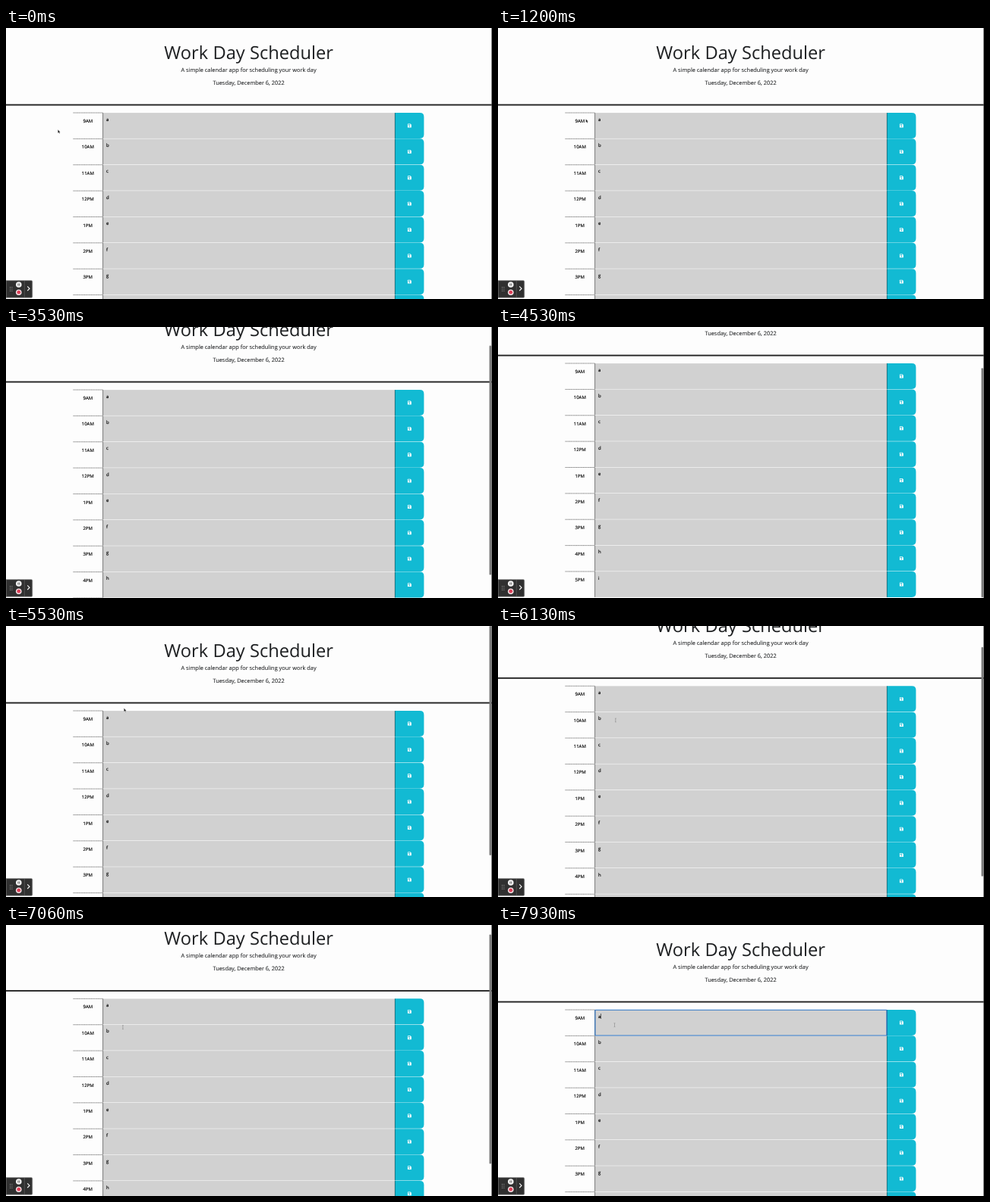
These frames come from a looping animation (640 by 358 pixels, 8000 ms). An HTML page:

```html
<!DOCTYPE html>
<html lang="en">
<head>
<meta charset="utf-8">
<title>Work Day Scheduler</title>
<style>
  html, body { margin: 0; width: 100%; height: 100%; overflow: hidden; background: #fdfdfd; }
  svg { display: block; width: 640px; height: 358px; }
  text { font-family: "Open Sans", "Noto Sans", sans-serif; fill: #1d1f21; text-rendering: geometricPrecision; }
  .mid { text-anchor: middle; }
  .head { font-size: 7.4px; stroke: #1d1f21; stroke-width: .08px; }
  .small { font-size: 6px; fill: #000; stroke: #000; stroke-width: .15px; }
</style>
</head>
<body>
<svg viewBox="0 0 640 358">
  <defs>
    <g id="save">
      <path d="M-2.4-1.9q0-.5.5-.5H1.3L2.5-1.2V1.9q0 .5-.5.5H-1.9q-.5 0-.5-.5z" fill="#fff"/>
      <path d="M-1.7-1.7H.9V-.5H-1.7z" fill="#12bad3"/>
      <circle cy=".9" r=".75" fill="#12bad3"/>
    </g>
  </defs>

  <g id="page">
    <text class="mid" x="319.7" y="40.8" font-size="23.7">Work Day Scheduler</text>
    <text class="mid head" x="319.6" y="57.6">A simple calendar app for scheduling your work day</text>
    <text class="mid head" x="319.6" y="74.6">Tuesday, December 6, 2022</text>
    <rect y="100.6" width="640" height="1.9" fill="#222"/>
    <g id="rows"></g>
    <g id="focus">
      <rect x="127.9" y="112.2" width="384" height="33.8" rx=".6" fill="none" stroke="#2a74c8" stroke-width="1.1"/>
      <rect x="135.4" y="117" width=".6" height="7" fill="#111"/>
    </g>
  </g>

  <rect id="thumb" x="636.5" width="2.5" height="303" rx="1.2" fill="#7c7c7c"/>
  <rect x="639.3" width=".7" height="358" fill="#444"/>

  <g id="recorder">
    <path d="M0 333.6H33.3q1.5 0 1.5 1.5V354.8q0 1.5-1.5 1.5H0z" fill="#303030" stroke="#999" stroke-width=".8"/>
    <path d="M24.3 334V356" stroke="#666" stroke-width=".6"/>
    <path d="M5.6 342v6M7.9 342v6" stroke="#aaa" stroke-width=".9" stroke-dasharray="1 1.4"/>
    <circle cx="16.8" cy="339" r="3.8" fill="#f4f4f4"/>
    <path d="M15.9 337.5v3M17.7 337.5v3" stroke="#444" stroke-width=".8"/>
    <circle cx="16.8" cy="349.2" r="3.8" fill="#f4e4e6"/>
    <circle cx="16.8" cy="349.2" r="2.4" fill="#dc4058"/>
    <path d="M28.2 341.3l2.8 2.9-2.8 2.9" fill="none" stroke="#fff" stroke-width="1.1"/>
  </g>

  <path id="arrow" d="M0 0V4.5L1.1 3.6 1.9 5.2 2.7 4.8 1.9 3.3H3.2z" fill="#111" stroke="#fff" stroke-width=".3"/>
  <path id="beam" d="M-.8-2.6Q0-2.6 0-2V2Q0 2.6-.8 2.6M.8-2.6Q0-2.6 0-2M0 2Q0 2.6.8 2.6" fill="none" stroke="#777" stroke-width=".5"/>
</svg>

<script>
const LOOP = 8000, TOP = 111.9, PITCH = 34.37, MAX_SCROLL = 64.4;
const $ = id => document.getElementById(id);

const row = i => {
  const hour = 9 + i, label = (hour > 12 ? hour - 12 : hour) + (hour < 12 ? "AM" : "PM");
  return `<g transform="translate(0 ${TOP + i * PITCH})">
    <path d="M88.5 .1H127.4" stroke="#222" stroke-width=".6" stroke-dasharray="1.2 .6"/>
    <text class="mid small" x="107.8" y="13.2">${label}</text>
    <rect x="127.5" y=".2" width="384.5" height="33.8" fill="#d1d1d1"/>
    <path d="M127.6 .2V34" stroke="#333" stroke-width=".6"/>
    <text class="small" x="131.9" y="10.8">${"abcdefghi"[i]}</text>
    <path d="M512 .1H545q5.4 0 5.4 5.4V28.7q0 5.4-5.4 5.4H512z" fill="#12bad3"/>
    <path d="M512.3 .2V34" stroke="#1c3c42" stroke-width=".6"/>
    <use href="#save" x="531.3" y="17.1"/>
  </g>`;
};
$("rows").innerHTML = Array.from({ length: 9 }, (_, i) => row(i)).join("");

// Progress from 0 to 1 between times a and b
const ramp = (t, a, b) => Math.min(1, Math.max(0, (t - a) / (b - a)));
const ease = (t, a, b) => {
  const u = ramp(t, a, b);
  return u * u * (3 - 2 * u);
};

// A slow start, a faster finish, then up, down and up again
const scrollAt = t =>
  29 * ramp(t, 2030, 3530) + (MAX_SCROLL - 29) * ease(t, 3530, 4600) +
  MAX_SCROLL * (ease(t, 5570, 6680) - ease(t, 4750, 5480) - ease(t, 6750, 7200));

const show = (id, on) => $(id).setAttribute("visibility", on ? "visible" : "hidden");
const move = (id, x, y) => $(id).setAttribute("transform", `translate(${x} ${y})`);

function draw(t) {
  const scroll = scrollAt(t);
  move("page", 0, -scroll);
  move("thumb", 0, scroll * 358 / 423);
  $("thumb").setAttribute("opacity", ramp(t, 2030, 2130) - ramp(t, 7450, 7650));

  const x = 68.3 + 87 * ease(t, 460, 1860) - 1.8 * ramp(t, 5600, 7460);
  const y = 134.3 - 25.7 * ease(t, 460, 1860) + 29 * ease(t, 5600, 6600) - 5.5 * ease(t, 6700, 7460);
  const visible = t < 1860 || t > 5000;
  const overText = x > 128 && y > TOP - scroll;
  show("arrow", visible && !overText);
  show("beam", visible && overText);
  move("arrow", x, y);
  move("beam", x, y);

  show("focus", t >= 7460);
}

function tick(now) {
  draw(now % LOOP);
  requestAnimationFrame(tick);
}
requestAnimationFrame(tick);
</script>
</body>
</html>
```
